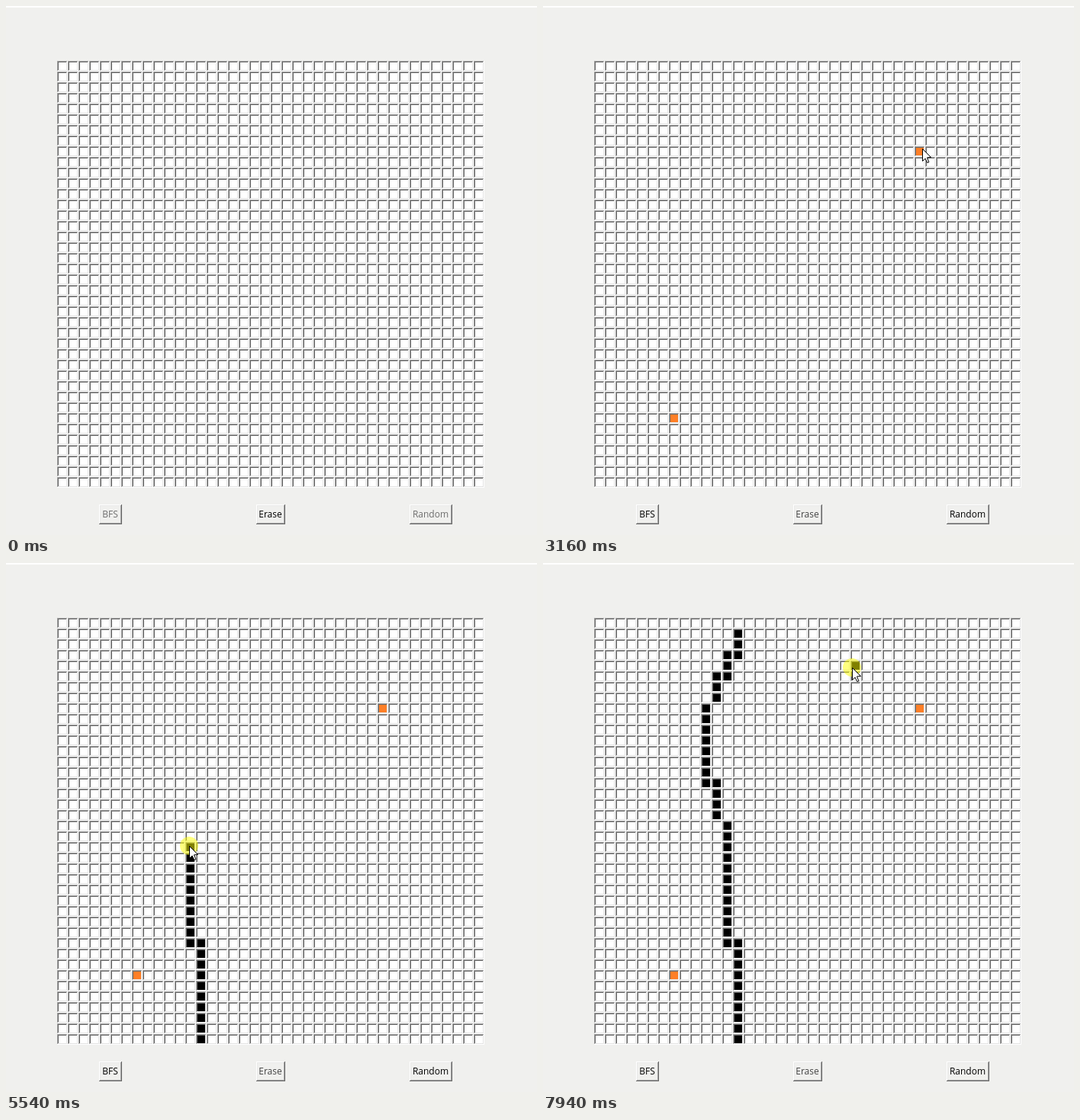
These frames come from a looping animation (696x694 px, 8 s). An HTML page with a canvas:

```html
<!DOCTYPE html>
<html lang="en">
<head>
<meta charset="utf-8">
<title>Grid drawing</title>
<style>
  html, body { margin: 0; width: 100%; height: 100%; overflow: hidden; background: #f0f0ee; }
  canvas { display: block; }
</style>
</head>
<body>
<canvas id="stage" width="696" height="694"></canvas>
<script>
const LOOP = 8000, TICK = 77.5, LEFT = 67, TOP = 72, CELL = 14, COUNT = 40;
const FACE = '#f0f0ee', ORANGE = '#ff7f27', BLACK = '#000';
const SUNKEN = ['#a0a0a0', '#696969', '#e3e3e3', '#ffffff'];
const RAISED = ['#ffffff', '#e9e9e8', '#a0a0a0', '#696969'];
const START_CLICK = 1760, END_CLICK = 3080, LAST_CLICK = 7940;
const ctx = document.getElementById('stage').getContext('2d');

// Key points of the hand-drawn wall, from bottom to top
const wallPath = [
  [255, 625], [253, 517], [242, 452], [240, 371], [235, 338], [221, 289],
  [218, 240], [220.9, 184], [237, 140], [249, 121], [257, 95]
];
const home = { x: 652, y: 695 };
const start = { x: 174, y: 541 }, goal = { x: 497, y: 187 };

// Free moves glide to a point; strokes follow the wall up to a height
const moves = [
  { from: 300, until: 1000, to: start },
  { from: 1300, until: 1300, to: { x: 174, y: 544 } },
  { from: 1380, until: 1380, to: start },
  { from: 2010, until: 2700, to: goal, bow: 0.018 },
  { from: 3390, until: 4160, to: { x: 266, y: 611 } },
  { from: 4240, until: 4310, to: { x: 255, y: 625 } },
  { from: 4540, until: 5310, rise: [625, 452], power: 1.3 },
  { from: 5390, until: 6170, rise: [429, 140], power: 1 },
  { from: 6230, until: 6540, rise: [128, 95], power: 1 },
  { from: 7000, until: 7390, to: { x: 393, y: 106 } },
  { from: 7560, until: 7790, to: { x: 406, y: 135 } },
  { from: LAST_CLICK, until: LAST_CLICK, to: { x: 405, y: 137 } }
];
const presses = [[START_CLICK, 1840], [END_CLICK, 3160], [4540, 7000], [LAST_CLICK, LOOP]];

const lerp = (a, b, u) => a + (b - a) * u;

function wallX(y) {
  const i = Math.max(1, wallPath.findIndex(p => p[1] <= y));
  const [x0, y0] = wallPath[i - 1], [x1, y1] = wallPath[i];
  return lerp(x0, x1, (y - y0) / (y1 - y0));
}

function glide(a, b, u, bow = 0) {
  const eased = 1 - (1 - u) ** 2.23, side = bow * Math.sin(Math.PI * eased);
  return {
    x: lerp(a.x, b.x, eased) - (b.y - a.y) * side,
    y: lerp(a.y, b.y, eased) + (b.x - a.x) * side
  };
}

function pointerAt(t) {
  let pos = home;
  for (const { from, until, to, bow, rise, power } of moves) {
    if (t < from) break;
    const steps = Math.round((until - from) / TICK) + 1;
    const step = Math.min(Math.floor((t - from) / TICK + 0.1), steps - 1);
    if (rise) {
      const y = lerp(...rise, (step / (steps - 1)) ** power);
      pos = { x: wallX(y), y };
    } else {
      pos = glide(pos, to, (step + 1) / steps, bow);
    }
  }
  return { x: Math.round(pos.x), y: Math.round(pos.y) };
}

function rect(g, x, y, w, h, color) {
  g.fillStyle = color;
  g.fillRect(x, y, w, h);
}

function bevel(g, x, y, w, h, [outerLight, innerLight, innerDark, outerDark], fill) {
  rect(g, x, y, w, h, outerDark);
  rect(g, x, y, w - 1, h - 1, outerLight);
  rect(g, x + 1, y + 1, w - 2, h - 2, innerDark);
  rect(g, x + 1, y + 1, w - 3, h - 3, innerLight);
  rect(g, x + 2, y + 2, w - 4, h - 4, fill);
}

const tile = document.createElement('canvas');
tile.width = tile.height = CELL;
bevel(tile.getContext('2d'), 0, 0, CELL, CELL, SUNKEN, '#fff');
const gridPattern = ctx.createPattern(tile, 'repeat');

function drawGrid() {
  ctx.save();
  ctx.translate(LEFT, TOP);
  rect(ctx, 0, 0, CELL * COUNT, CELL * COUNT, gridPattern);
  ctx.restore();
}

function fillCellAt({ x, y }, color) {
  const snap = (v, edge) => edge + Math.floor((v - edge) / CELL) * CELL + 2;
  rect(ctx, snap(x, LEFT), snap(y, TOP), CELL - 4, CELL - 4, color);
}

function drawWall(t, pointer) {
  const top = t < 7000 ? pointer.y : 95;
  for (let y = 625; y >= top; y--) fillCellAt({ x: wallX(y), y }, BLACK);
}

function drawButton(label, x, w, color) {
  bevel(ctx, x, 654, w, 26, RAISED, FACE);
  ctx.font = '12px "Open Sans", "Noto Sans", sans-serif';
  ctx.textAlign = 'center';
  ctx.fillStyle = color;
  ctx.fillText(label, x + w / 2 - 0.5, 671);
}

function drawPointer({ x, y }, pressed) {
  if (pressed) {
    ctx.fillStyle = 'rgba(255, 255, 0, 0.5)';
    ctx.beginPath();
    ctx.arc(x, y, 12, 0, Math.PI * 2);
    ctx.fill();
  }
  ctx.save();
  ctx.translate(x + 0.5, y + 0.5);
  ctx.beginPath();
  for (const p of [[0, 0], [0, 16], [3.6, 12.6], [6.2, 18], [8.4, 17.4], [6, 11.4], [11, 11]]) ctx.lineTo(...p);
  ctx.closePath();
  ctx.fillStyle = '#fff';
  ctx.fill();
  ctx.strokeStyle = BLACK;
  ctx.lineWidth = 1;
  ctx.stroke();
  ctx.restore();
}

function draw(t) {
  const pointer = pointerAt(t), ready = t >= END_CLICK;
  rect(ctx, 0, 0, 696, 694, FACE);
  rect(ctx, 0, 0, 696, 2, '#fff');
  drawGrid();
  if (t >= START_CLICK) fillCellAt(start, ORANGE);
  if (ready) fillCellAt(goal, ORANGE);
  if (t >= 4540) drawWall(t, pointer);
  if (t >= LAST_CLICK) fillCellAt(pointer, BLACK);
  drawButton('BFS', 122, 30, ready ? BLACK : '#6d6d6d');
  drawButton('Erase', 328, 38, ready ? '#444' : BLACK);
  drawButton('Random', 529, 56, ready ? BLACK : '#6d6d6d');
  if (t >= 300) drawPointer(pointer, presses.some(([down, up]) => t >= down && t < up));
}

const origin = performance.now();
function frame() {
  draw((performance.now() - origin) % LOOP);
  requestAnimationFrame(frame);
}
frame();
</script>
</body>
</html>
```
